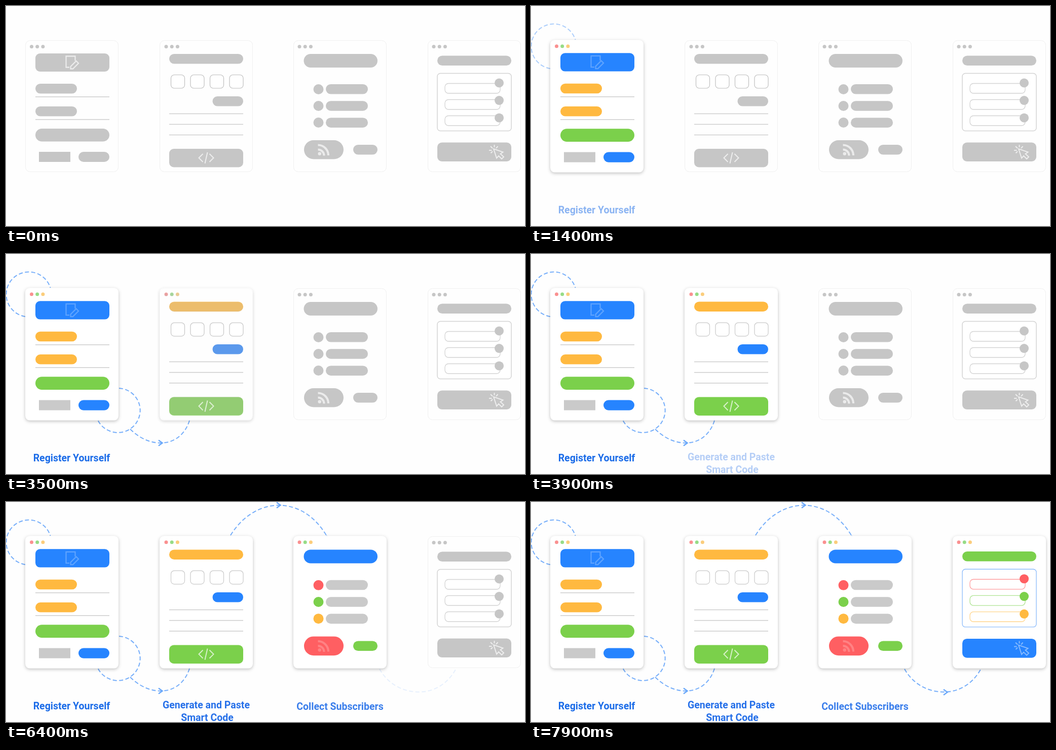
These frames come from a looping animation (1024 px wide and 436 px high, 8 s). An HTML page:

```html
<!DOCTYPE html>
<html lang="en">
<head>
<meta charset="utf-8">
<title>Four steps</title>
<style>
  html, body { margin: 0; width: 100%; height: 100%; overflow: hidden; background: #fefefe; }
  svg { display: block; width: 1024px; height: 436px; }
  text { font: 700 19.5px Roboto, sans-serif; text-anchor: middle; }
  .link { fill: none; stroke: #76aefa; stroke-width: 2; stroke-dasharray: 8 4.5; }
  .tip { fill: none; stroke: #6aa8fa; stroke-width: 2.4; }
  .icon { fill: none; stroke: #fff; stroke-width: 2.3; }
  .lit { filter: drop-shadow(0 2px 3px rgba(0, 0, 0, .24)); }
</style>
</head>
<body>
<svg id="stage" viewBox="0 0 1024 436" xmlns="http://www.w3.org/2000/svg">
  <defs>
    <linearGradient id="emerge" gradientUnits="userSpaceOnUse" x1="632" y1="0" x2="648" y2="0">
      <stop stop-color="#76aefa" stop-opacity=".45"/>
      <stop offset="1" stop-color="#76aefa"/>
    </linearGradient>
  </defs>
</svg>
<script>
const LOOP = 8000, STEP = 100;
const GREY = '#c6c6c6', BLUE = '#2684ff', GREEN = '#7bd04b', ORANGE = '#ffb940', RED = '#ff5f62';
const CARD_X = [38, 303, 567, 832];

const box = (x, y, w, h, r, fill, extra = '') =>
  `<rect x="${x}" y="${y}" width="${w}" height="${h}" rx="${r}" fill="${fill}" ${extra}/>`;
const pill = (x, y, w, h, fill) => box(x, y, w, h, h / 2, fill);
const frame = (x, y, w, h, r, color, width = 1.2) =>
  box(x, y, w, h, r, '#fff', `stroke="${color}" stroke-width="${width}"`);
const dot = (x, y, r, fill) => `<circle cx="${x}" cy="${y}" r="${r}" fill="${fill}"/>`;
const rule = (x, y) => box(x, y - .75, 146, 1.5, 0, '#cdcdcd');
const icon = (d, alpha, extra = '') => `<path class="icon" d="${d}" stroke-opacity="${alpha}" ${extra}/>`;
const link = d => `<path class="link" d="${d}"/>`;
const tip = (x, y) => `<path class="tip" d="M${x - 7} ${y - 5.5}l7.5 5.5-7.5 5.5"/>`;
const label = (x, y, s, fill) => `<text x="${x}" y="${y}" fill="${fill}">${s}</text>`;

// c(color) gives the color when lit, grey otherwise
const bodies = [
  (c, lit) =>
    box(58, 94, 146, 36, 9, c(BLUE)) +
    icon('M125 121.5h-6.5v-22h18v9M127.5 124.5v-4.5l11-11 4.5 4.5-11 11z', lit ? .26 : .65) +
    [154, 199].map(y => pill(58, y, 82, 19.5, c(ORANGE)) + rule(58, y + 26)).join('') +
    pill(58, 243, 146, 25.5, c(GREEN)) +
    box(65, 289, 62, 20, 0, lit ? '#cacaca' : GREY) +
    pill(143, 289, 61, 20, c(BLUE)),

  (c, lit) =>
    pill(322, 95, 146, 19.5, c(ORANGE)) +
    [0, 1, 2, 3].map(i => frame(325.5 + i * 38.5, 136.5, 27, 26.5, 6.5, lit ? '#c9c9c9' : '#bebebe')).join('') +
    pill(407.5, 179, 60.5, 19.5, c(BLUE)) +
    [213.5, 234.5, 255.5].map(y => rule(322, y)).join('') +
    box(322, 283, 146, 36.5, 9, c(GREEN)) +
    icon('M388.5 293l-8 8 8 8M401.5 293l8 8-8 8M397.5 290l-5 22', .7, 'style="stroke-width:2"'),

  (c, lit) =>
    pill(587.5, 95, 145.5, 27, c(BLUE)) +
    [RED, GREEN, ORANGE].map((k, i) =>
      dot(616.5, 165 + i * 33, 10, c(k)) +
      pill(631, 155 + i * 33.2, 83, 19.5, lit ? '#cacaca' : GREY)).join('') +
    pill(588, 266, 78, 37.5, c(RED)) +
    icon('M615.5 284.5a12 12 0 0 1 12 12M615.5 275.5a20.5 20.5 0 0 1 20.5 20.5', lit ? .22 : .65, 'style="stroke-width:4.2"') +
    `<circle cx="618.8" cy="292.8" r="3.3" fill="#fff" fill-opacity="${lit ? .22 : .65}"/>` +
    pill(685, 275, 48, 19.5, c(GREEN)),

  (c, lit) =>
    pill(851, 98.5, 146, 19.5, c(GREEN)) +
    frame(851, 133.5, 146, 114, 6, lit ? '#76aefa' : '#d4d4d4', lit ? 1.1 : 1.5) +
    [RED, GREEN, ORANGE].map((k, i) =>
      box(866, 153.5 + i * 32, 109, 19.5, 7, '#fff',
        `stroke="${lit ? k : '#d4d4d4'}" stroke-opacity="${lit ? .6 : 1}" stroke-width="1.3"`) +
      dot(973, 152.5 + i * 34.6, 9, c(k))).join('') +
    box(851, 270.5, 146, 37.5, 9, c(BLUE)) +
    icon('M962 283l6 18.5 4-4.5 6 6 4-4-6.5-6 5-3.5zM953 286h5.5M956 278l4 4M963.5 275v5M970.5 278l-3.5 4M960 288l-3.5 3.5',
      lit ? .45 : .7, 'style="stroke-width:2"')
];

function card(i, lit) {
  const x = CARD_X[i], c = k => lit ? k : GREY;
  const shell = lit
    ? box(x, 68, 184, 261, 9, '#fff', 'class="lit"')
    : box(x + .5, 68.5, 183, 260, 9, '#fefefe', 'stroke="#f0f0f0"');
  const lights = ['#fa9090', '#96dc86', '#fbcd7c'].map((k, n) =>
    dot(x + [12.5, 13, 12, 12][i] + n * 11.2, 80.5, 3.5, c(k))).join('');
  // lit cards stand a touch taller
  const lift = lit ? 'transform="translate(0 -1.19) scale(1 1.006)"' : '';
  return `<g ${lift}>${shell}${lights}${bodies[i](c, lit)}</g>`;
}

// [start, duration, markup] in paint order
const parts = [
  [1100, 500, link('M38 124A44.5 44.5 0 1 1 87.5 67')],
  [1500, 600, link('M223 266A44 44 0 1 1 181.5 330')],
  [2100, 600, link('M245 347C262 364 283 374.5 305 374.5C331 374.5 353 359 362 330')],
  [2700, 400, tip(308, 374.5)],
  [4300, 600, link('M443 66C465 30 500 6.5 538 6.5C579 6.5 611 31 632 66')],
  [4800, 300, '<path class="link" style="stroke:url(#emerge)" d="M632 66C643 82 653 99 660 118"/>' + tip(541, 6.3)],
  [6300, 600, link('M737 331C752 358 780 376.5 815 376.5C846 376.5 872 359 887 332')],
  [6900, 400, tip(821, 377)],
  [300, 800, card(0, true)],
  [3100, 600, card(1, true)],
  [5100, 600, card(2, true)],
  [7300, 600, card(3, true)],
  [1100, 600, label(129.5, 411, 'Register Yourself', '#1b6ce8')],
  [3700, 600, label(395, 409, 'Generate and Paste', '#2670e9') + label(397, 434, 'Smart Code', '#2670e9')],
  [5600, 500, label(659, 412, 'Collect Subscribers', '#3a7eeb')]
];

const stage = document.getElementById('stage');
stage.insertAdjacentHTML('beforeend',
  CARD_X.map((_, i) => card(i, false)).join('') +
  parts.map(p => `<g class="part" opacity="0">${p[2]}</g>`).join(''));
const nodes = stage.querySelectorAll('.part');

function draw(now) {
  const t = Math.floor(now % LOOP / STEP) * STEP;
  parts.forEach(([start, span], i) => {
    nodes[i].setAttribute('opacity', Math.min(1, Math.max(0, (t - start) / span)));
  });
}

const origin = performance.now();
function tick() {
  draw(performance.now() - origin);
  requestAnimationFrame(tick);
}
tick();
</script>
</body>
</html>
```
